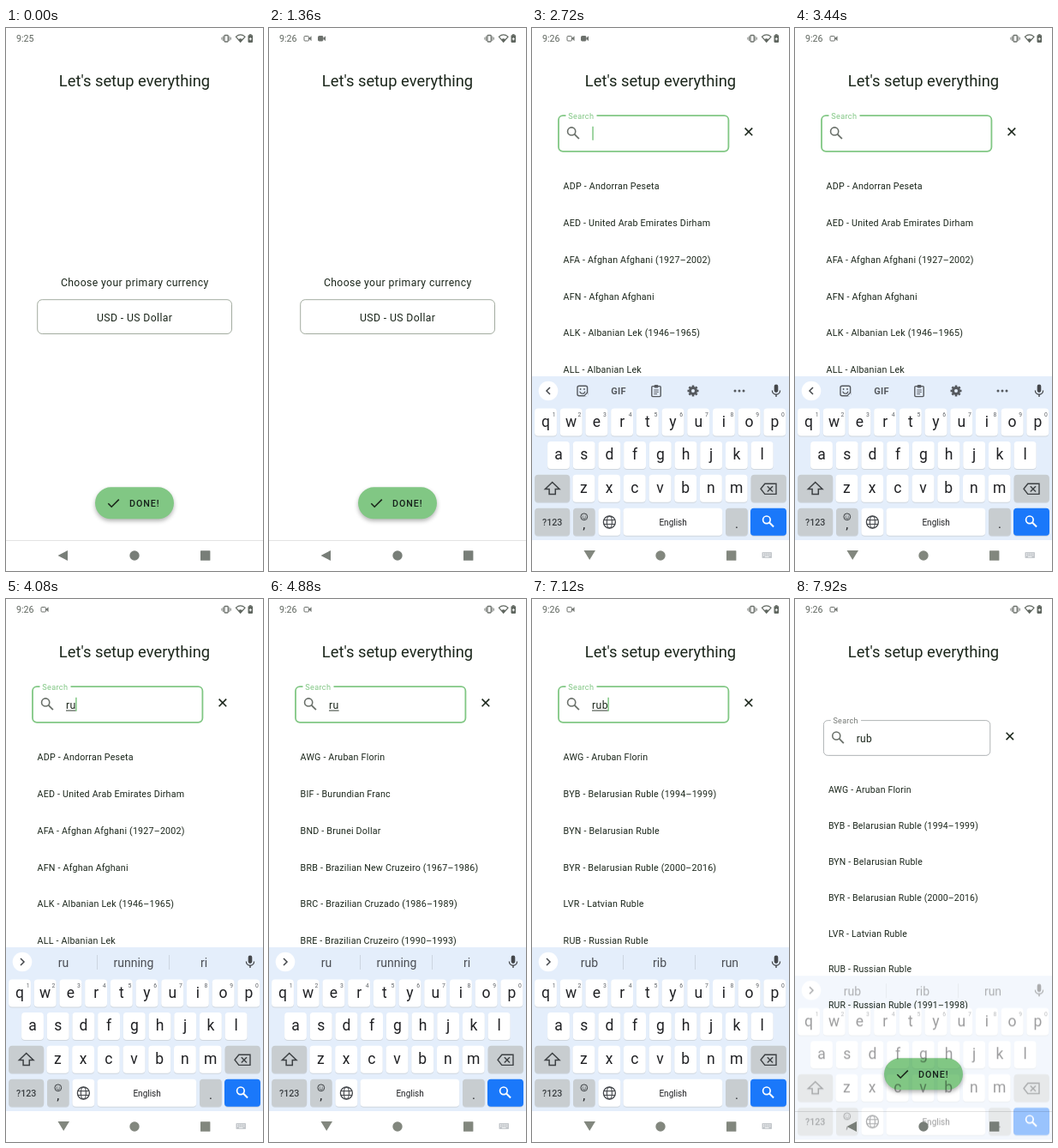
Write an HTML page with a canvas that moves like this. It is 300 px wide and 633 px high and loops after 8000 ms.

```html
<!DOCTYPE html>
<html lang="en">
<head>
<meta charset="utf-8">
<title>Currency setup</title>
<style>
html, body { margin: 0; width: 100%; height: 100%; overflow: hidden; background: #fff; }
canvas { display: block; width: 300px; height: 633px; }
</style>
</head>
<body>
<canvas id="stage"></canvas>
<script>
const W = 300, H = 633, LOOP = 8000;
const INK = '#1b261b', GREY = '#6c716c', GREEN = '#81c784';
const KEY_INK = '#202124', KEYS_BG = '#e4eefb', KEY_DARK = '#c8cdd0';
const NAV_TOP = 597, PANEL_TOP = 84, KEYS_TOP = 406, ROW = 42.76;

// Timeline in ms
const CLOCK = 560, OPEN = 1920, KEYS_IN = 2100, FOCUS = 2480, ICON_OFF = 3360;
const TYPING = [[3680, 'r'], [3920, 'ru'], [5640, 'rub']];
const FILTER_RU = 4420, FILTER_RUB = 5840, KEYS_OUT = 7760, CLOSE = 7842;

const HINTS = {
  r: ['r', 'right', 're'],
  ru: ['ru', 'running', 'ri'],
  rub: ['rub', 'rib', 'run']
};
const ALL = ['ADP - Andorran Peseta', 'AED - United Arab Emirates Dirham',
  'AFA - Afghan Afghani (1927–2002)', 'AFN - Afghan Afghani',
  'ALK - Albanian Lek (1946–1965)', 'ALL - Albanian Lek', 'AMD - Armenian Dram',
  'ANG - Netherlands Antillean Guilder', 'AOA - Angolan Kwanza'];
const RU = ['AWG - Aruban Florin', 'BIF - Burundian Franc', 'BND - Brunei Dollar',
  'BRB - Brazilian New Cruzeiro (1967–1986)', 'BRC - Brazilian Cruzado (1986–1989)',
  'BRE - Brazilian Cruzeiro (1990–1993)'];
const RUB = ['AWG - Aruban Florin', 'BYB - Belarusian Ruble (1994–1999)',
  'BYN - Belarusian Ruble', 'BYR - Belarusian Ruble (2000–2016)',
  'LVR - Latvian Ruble', 'RUB - Russian Ruble', 'RUR - Russian Ruble (1991–1998)'];

const dpr = window.devicePixelRatio || 1;
function setup(c) {
  c.width = W * dpr;
  c.height = H * dpr;
  const ctx = c.getContext('2d');
  ctx.scale(dpr, dpr);
  return ctx;
}
const stage = setup(document.getElementById('stage'));
const layer = document.createElement('canvas');
const layerCtx = setup(layer);
let g = stage;

const clamp = v => Math.max(0, Math.min(1, v));
const lerp = (a, b, p) => a + (b - a) * p;
const smooth = v => { v = clamp(v); return v * v * (3 - 2 * v); };
const ramp = (t, start, len) => smooth((t - start) / len);

function text(s, x, y, size, o = {}) {
  g.font = `${o.weight || 400} ${size}px Roboto, sans-serif`;
  g.letterSpacing = (o.gap || 0) + 'px';
  g.textAlign = o.align || 'left';
  g.fillStyle = o.color || INK;
  g.fillText(s, x, y);
}
const centered = (s, x, y, size, o = {}) => text(s, x, y, size, { ...o, align: 'center' });

function box(x, y, w, h, r, fill) {
  g.beginPath();
  g.roundRect(x, y, w, h, r);
  if (fill) { g.fillStyle = fill; g.fill(); }
}
function stroke(color, width) {
  g.strokeStyle = color;
  g.lineWidth = width;
  g.stroke();
}
function poly(pts, fill, width) {
  g.beginPath();
  pts.forEach(([x, y], i) => i ? g.lineTo(x, y) : g.moveTo(x, y));
  if (width) return stroke(fill, width);
  g.closePath();
  g.fillStyle = fill;
  g.fill();
}
function disc(x, y, r, fill) {
  g.beginPath();
  g.arc(x, y, r, 0, Math.PI * 2);
  if (fill) { g.fillStyle = fill; g.fill(); }
}
function lens(x, y, r, color, width) {
  disc(x - r * .4, y - r * .4, r);
  stroke(color, width);
  poly([[x + r * .35, y + r * .35], [x + r * 1.5, y + r * 1.5]], color, width * 1.15);
}

function camera(x, solid) {
  box(x + .5, 9.5, 5.5, 5.5, 1, solid && GREY);
  stroke(GREY, 1);
  poly([[x + 6, 12.2], [x + 9, 9.3], [x + 9, 15.2]], GREY);
}

function statusBar(t) {
  text(t < CLOCK ? '9:25' : '9:26', 12, 16, 10.69, { color: '#5f665f' });
  if (t >= CLOCK) {
    camera(40.5, false);
    if (t < ICON_OFF) camera(57, true);
  }
  box(255, 8.5, 4.2, 7.5, .8);
  stroke(GREY, 1.3);
  for (const d of [-1, 1]) {
    poly([[257.1 + d * 3.7, 9.5], [257.1 + d * 3.7, 15]], GREY, .9);
    poly([[257.1 + d * 5.2, 10.8], [257.1 + d * 5.2, 13.7]], GREY, .9);
  }
  g.beginPath();
  g.moveTo(268.4, 10.2);
  g.quadraticCurveTo(273.7, 5.6, 279, 10.2);
  g.lineTo(273.7, 16.4);
  g.closePath();
  stroke('#5f665f', 1.1);
  poly([[271.2, 13], [273.7, 12.2], [276.2, 13], [273.7, 16.4]], '#5f665f');
  box(282.5, 8.3, 5.6, 8.6, .8, '#5f665f');
  box(284, 7.2, 2.6, 1.5, 0, '#5f665f');
  poly([[283.8, 12.8], [286.9, 12.8]], '#fff', 1);
  poly([[285.3, 11.2], [285.3, 14.4]], '#fff', 1);
}

function navBar(typing) {
  const c = typing ? '#82877e' : '#787e78';
  if (typing) {
    poly([[60.5, 609], [74, 609], [67.2, 620]], c);
    box(268.5, 611, 11.5, 7, .8, '#c4c8cc');
    g.fillStyle = '#fff';
    for (let i = 0; i < 8; i++) g.fillRect(270 + i % 4 * 2.4, 612.3 + (i >> 2) * 1.9, 1.1, 1);
    g.fillRect(272, 616.2, 4.5, .8);
  } else {
    poly([[60.5, 615], [72, 609], [72, 621]], c);
  }
  disc(150, 615, 5.7, c);
  box(227, 609.3, 11.4, 11.4, .5, c);
}

function setupScreen() {
  centered("Let's setup everything", 150, 68.3, 18.33);
  centered('Choose your primary currency', 150.3, 301, 12.22, { gap: .38 });
  box(36.7, 316.7, 226.8, 39.8, 5.5);
  stroke('#a3aca0', 1);
  centered('USD - US Dollar', 150.2, 342, 12.22, { gap: .38 });

  g.save();
  g.shadowColor = 'rgba(0,0,0,.3)';
  g.shadowBlur = 5 * dpr;
  g.shadowOffsetY = 2.5 * dpr;
  box(104, 535.3, 92, 37, 18.5, GREEN);
  g.restore();
  poly([[119.3, 554.3], [123.2, 558.2], [131.8, 549.6]], INK, 1.6);
  text('DONE!', 144, 558, 10.69, { weight: 500, gap: .95, color: '#16201a' });

  g.fillStyle = '#e3e3e3';
  g.fillRect(0, NAV_TOP, W, 1);
}

function row(s, y, alpha) {
  const base = g.globalAlpha;
  g.globalAlpha = base * alpha;
  text(s, 36.6, y, 10.69, { gap: .19 });
  g.globalAlpha = base;
}

// Removed rows fade, then the remaining ones travel up into place.
function swapRows(from, to, dt) {
  const moving = dt >= 120;
  const shift = moving ? 300 * (1 - ramp(dt, 120, 250)) : 0;
  (moving ? to : from).forEach((s, i) => {
    const kept = from[i] === to[i];
    const y = 188.3 + i * ROW;
    if (moving) row(s, y + (kept ? 0 : shift), 1);
    else row(s, y, kept || dt < 0 ? 1 : 1 - dt / 120);
  });
}

function typed(t) {
  let word = '', since = FOCUS;
  for (const [at, s] of TYPING) if (t >= at) { word = s; since = at; }
  return { word, since };
}

function searchPanel(t) {
  const focused = t >= FOCUS - 200 && t < KEYS_OUT;
  const { word, since } = typed(t);
  box(31, 102.2, 198.4, 41.6, 5);
  stroke(focused ? GREEN : '#aeb2b4', focused ? 1.8 : 1);
  g.fillStyle = '#fff';
  g.fillRect(39.5, 100, 36, 5);
  text('Search', 42.3, 106, 9.17, { gap: .3, color: focused ? GREEN : '#747874' });
  lens(48, 122.3, 4.6, '#6a706a', 1.6);
  text(word, 70, 127.8, 12.22, { gap: .38 });
  const end = 70 + g.measureText(word).width;
  if (focused) {
    if (word) {
      g.fillStyle = INK;
      g.fillRect(70, 129.6, end - 70, .9);
    }
    if (t >= FOCUS && (t - since) % 1000 < 500) {
      g.fillStyle = GREEN;
      g.fillRect(end + (word ? -.5 : .3), 114.8, 1.5, 16);
    }
  }
  poly([[248.6, 116.6], [257.2, 125.2]], INK, 1.6);
  poly([[257.2, 116.6], [248.6, 125.2]], INK, 1.6);
  if (t < FILTER_RUB) swapRows(ALL, RU, t - FILTER_RU);
  else swapRows(RU, RUB, t - FILTER_RUB);
}

// m: 0 is the open panel, 1 the collapsed field
function drawPanel(t, m) {
  const left = lerp(0, 36, m), top = lerp(PANEL_TOP, 316, m);
  const bottom = lerp(NAV_TOP, 357, clamp(2.9 * m));
  const scale = 1 - .24 * Math.pow(m, 1.4);
  g.save();
  box(left, top, W - 2 * left, bottom - top, 6 * m, '#fff');
  g.clip();
  g.globalAlpha = clamp(1.6 * (1 - m));
  g.translate(150, top);
  g.scale(scale, scale);
  g.translate(-150, -PANEL_TOP);
  searchPanel(t);
  g.restore();
}

function key(x, cy, w, fill = '#fff') {
  box(x, cy - 15, w, 32, 4, '#cfd6de');
  box(x, cy - 16, w, 32, 4, fill);
}

function letters(s, x0, cy) {
  [...s].forEach((ch, i) => {
    const x = x0 + i * 29.7;
    key(x - 12.9, cy, 25.8);
    centered(ch, x, cy + 5.4, 17.5, { color: KEY_INK });
    if (s.length === 10) centered((i + 1) % 10, x + 9.6, cy - 6.2, 6.8, { color: '#5f6368' });
  });
}

function mic(x, y) {
  const c = '#44474b';
  box(x - 2.3, y - 7.3, 4.6, 9.4, 2.3, c);
  g.beginPath();
  g.arc(x, y - .3, 4.6, 0, Math.PI);
  stroke(c, 1.3);
  poly([[x, y + 4.3], [x, y + 7.3]], c, 1.4);
}

function toolbar() {
  const c = '#55595e';
  box(53, 417.2, 11.6, 11.6, 2);
  stroke(c, 1.4);
  disc(56.6, 421, .9, c);
  disc(61, 421, .9, c);
  g.beginPath();
  g.arc(58.8, 423, 3.2, .2, Math.PI - .2);
  stroke(c, 1.2);
  poly([[60.8, 429.4], [65.2, 425], [65.2, 429.4]], KEYS_BG);
  poly([[60.8, 428.8], [64.6, 425]], c, 1.2);

  centered('GIF', 101, 427, 11, { weight: 700, color: c, gap: .3 });

  box(139.8, 417.6, 10.4, 12, 1);
  stroke(c, 1.4);
  box(142.6, 416, 4.8, 3.4, 1, c);
  for (const [y, w] of [[422, 5.5], [424.3, 5.5], [426.6, 3.8]]) {
    poly([[142.3, y], [142.3 + w, y]], c, 1);
  }

  for (let i = 0; i < 8; i++) {
    const a = i * Math.PI / 4, cx = Math.cos(a), sy = Math.sin(a);
    poly([[188 + cx * 3, 423 + sy * 3], [188 + cx * 6.5, 423 + sy * 6.5]], c, 2.6);
  }
  disc(188, 423, 5, c);
  disc(188, 423, 2, KEYS_BG);
  for (const x of [237, 242, 247]) disc(x, 423, 1.5, c);
}

function suggestions(words) {
  words.forEach((s, i) => centered(s, 67 + i * 82, 428.5, 14, { color: '#4b4e54' }));
  g.fillStyle = '#ccd5e0';
  g.fillRect(106, 415, 1, 17);
  g.fillRect(190, 415, 1, 17);
}

function keyboard(word) {
  g.fillStyle = KEYS_BG;
  g.fillRect(0, KEYS_TOP, W, NAV_TOP - KEYS_TOP);

  disc(19, 423, 11.3, '#fff');
  const d = word ? 1 : -1;
  poly([[19 - d * 2, 419], [19 + d * 2, 423], [19 - d * 2, 427]], '#44474b', 1.5);
  if (word) suggestions(HINTS[word]);
  else toolbar();
  mic(285, 422.8);

  letters('qwertyuiop', 16, 459.5);
  letters('asdfghjkl', 31, 498);
  letters('zxcvbnm', 60.4, 536.8);

  key(3.2, 536.8, 41, KEY_DARK);
  poly([[23.7, 529.5], [32, 537.5], [27.3, 537.5], [27.3, 543.6], [20.1, 543.6],
    [20.1, 537.5], [15.4, 537.5], [23.7, 529.5], [25, 530.8]], '#3c4043', 1.5);
  key(255.6, 536.8, 41.2, KEY_DARK);
  poly([[267, 537.3], [271.8, 531.2], [285, 531.2], [285, 543.4], [271.8, 543.4],
    [267, 537.3], [267.6, 536.5]], '#3c4043', 1.4);
  poly([[274.8, 534.2], [281, 540.4]], '#3c4043', 1.4);
  poly([[281, 534.2], [274.8, 540.4]], '#3c4043', 1.4);

  const cy = 575.8;
  key(3.2, cy, 41, KEY_DARK);
  centered('?123', 23.7, 580, 10.7, { weight: 500, color: '#3c4043' });
  key(48, cy, 25.6, KEY_DARK);
  disc(60.8, 569.8, 3.9);
  stroke('#3c4043', 1);
  disc(59.4, 569, .6, '#3c4043');
  disc(62.2, 569, .6, '#3c4043');
  g.beginPath();
  g.arc(60.8, 570, 2, .2, Math.PI - .2);
  stroke('#3c4043', .8);
  centered(',', 60.8, 584.3, 15, { color: KEY_INK });
  key(77.5, cy, 25.8);
  disc(90.4, 576, 7);
  stroke('#44474b', 1.3);
  g.beginPath();
  g.ellipse(90.4, 576, 3, 7, 0, 0, Math.PI * 2);
  stroke('#44474b', 1.1);
  for (const y of [573.6, 578.4]) poly([[84, y], [96.8, y]], '#44474b', 1.1);
  key(106.6, cy, 115.6);
  centered('English', 164.6, 579.6, 10, { color: KEY_INK });
  key(226, cy, 25.8, KEY_DARK);
  centered('.', 238.9, 583, 15, { color: KEY_INK });
  key(255, cy, 42, '#1a78fa');
  lens(275.6, 575, 4.3, '#fff', 1.7);
}

function drawKeyboard(t, shown) {
  g = layerCtx;
  g.clearRect(0, 0, W, H);
  keyboard(typed(t).word);
  g = stage;
  g.save();
  g.globalAlpha = shown;
  // While leaving, what lies below keeps its full strength.
  if (t >= KEYS_OUT) g.globalCompositeOperation = 'multiply';
  g.drawImage(layer, 0, 60 * (1 - shown), W, H);
  g.restore();
}

function draw(t) {
  g.fillStyle = '#fff';
  g.fillRect(0, 0, W, H);
  setupScreen();
  const m = 1 - ramp(t, OPEN, 400) + ramp(t, CLOSE, 300);
  const shown = ramp(t, KEYS_IN, 340) - ramp(t, KEYS_OUT, 300);
  if (m < 1) drawPanel(t, m);
  if (m < .001) {
    g.fillStyle = '#fff';
    g.fillRect(0, NAV_TOP, W, H - NAV_TOP);
  }
  if (shown > 0) drawKeyboard(t, shown);
  statusBar(t);
  navBar(t >= KEYS_IN && t < KEYS_OUT);
}

const start = performance.now();
function tick() {
  draw((performance.now() - start) % LOOP);
  requestAnimationFrame(tick);
}
tick();
</script>
</body>
</html>
```
